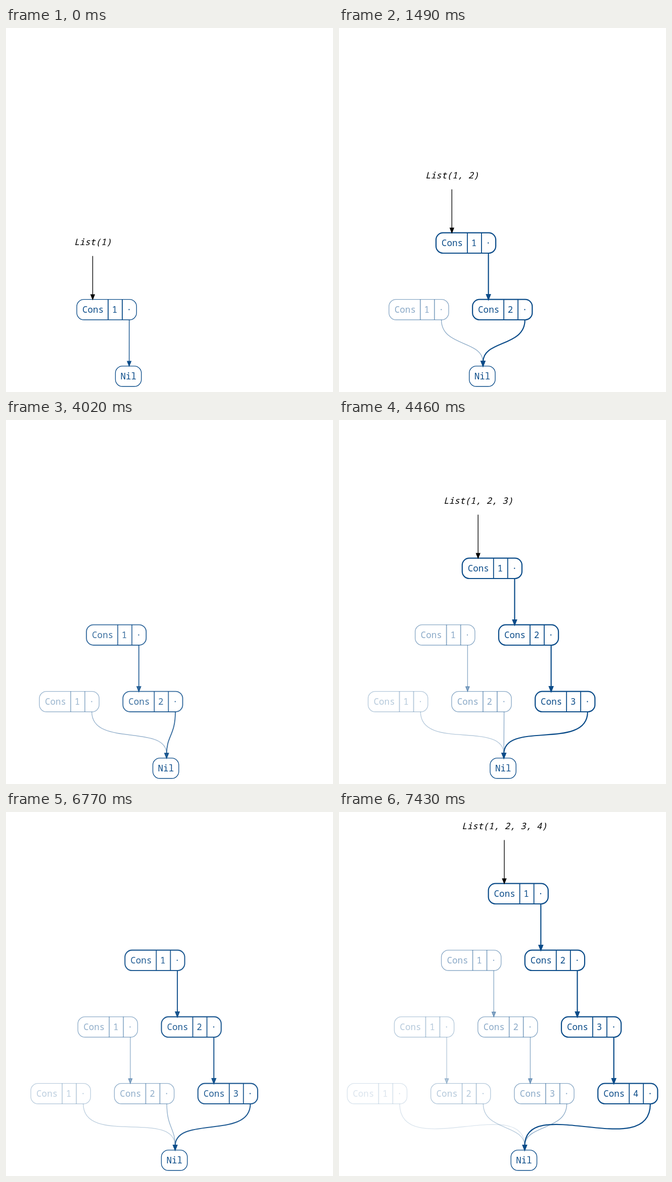
These frames come from a looping animation (647 by 721 pixels, 8 s). An HTML page with a canvas:

```html
<!DOCTYPE html>
<html lang="en">
<head>
<meta charset="utf-8">
<title>Appending to a persistent list</title>
<style>
  html, body { margin: 0; width: 100%; height: 100%; overflow: hidden; background: #fff; }
  canvas { display: block; }
</style>
</head>
<body>
<canvas id="stage" width="647" height="721"></canvas>
<script>
const ctx = document.getElementById("stage").getContext("2d");
const LOOP = 8000, STEP = 110, STEPS = 10;
const STARTS = [500, 3470, 6440];
const BLUE = "#0b4c89", THIN = 1.35, BOLD = 2.2;
const AGE_ALPHA = [1, 0.48, 0.3, 0.15];
const NIL_TOP = 669.6, ROW = 132, HEIGHT = 40.4;
const FONT = "17.6px 'Noto Sans Mono', monospace";

const lerp = (a, b, p) => a + (b - a) * p;
const clamp = v => Math.min(1, Math.max(0, v));
const easeQuart = t => t < 0.5 ? 8 * t ** 4 : 1 - 8 * (1 - t) ** 4;

// "size" is the list length, fractional while the layout moves.
const nilX = size => 216.5 + 41.25 * (size - 1);
const consX = (chain, item, size) =>
  140.1 + 165.3 * (chain - 1) - 41.25 * (size - 1) - 72.2 * (chain - item);
const consTop = (chain, item) => NIL_TOP - ROW * (chain - item + 1);

function pen(color, alpha, width) {
  ctx.strokeStyle = ctx.fillStyle = color;
  ctx.globalAlpha = alpha;
  ctx.lineWidth = width;
}

function text(string, x, y, style = "") {
  ctx.font = style + FONT;
  ctx.fillText(string, x, y);
}

function line(x1, y1, x2, y2) {
  ctx.beginPath();
  ctx.moveTo(x1, y1);
  ctx.lineTo(x2, y2);
  ctx.stroke();
}

function box(x, y, width) {
  ctx.beginPath();
  ctx.roundRect(x, y, width, HEIGHT, 14);
  ctx.stroke();
}

function arrowHead(x, tip) {
  ctx.beginPath();
  ctx.moveTo(x - 3.7, tip - 9.5);
  ctx.lineTo(x + 3.7, tip - 9.5);
  ctx.lineTo(x, tip);
  ctx.closePath();
  ctx.fill();
  ctx.stroke();
}

function arrow(x, from, tip) {
  line(x, from, x, tip - 9.5);
  arrowHead(x, tip);
}

// The wider the gap, the more the curve sags and rises.
function nilEdge(x, from, endX) {
  const bend = 624.4 + 0.00112 * (endX - x) ** 2;
  ctx.beginPath();
  ctx.moveTo(x, from);
  ctx.bezierCurveTo(x, bend, endX, 1250 - bend, endX, NIL_TOP - 8);
  ctx.stroke();
  arrowHead(endX, NIL_TOP);
}

function drawChain(chain, size, alpha, width) {
  for (let item = 1; item <= chain; item++) {
    const x = consX(chain, item, size), top = consTop(chain, item);
    const bottom = top + HEIGHT, tail = x + 103.7;
    pen(BLUE, alpha, width);
    box(x, top, 118.2);
    if (item < chain) arrow(tail, bottom, top + ROW);
    else nilEdge(tail, bottom, nilX(size) + 27.2);
    pen(BLUE, alpha, 1.8);
    line(x + 62, top, x + 62, bottom);
    line(x + 90, top, x + 90, bottom);
    text("Cons", x + 32, top + 26);
    text(item, x + 75, top + 26);
    text("·", tail - 0.3, top + 26);
  }
}

function drawLabel(size, alpha) {
  const x = consX(size, 1, size) + 31.4, top = consTop(size, 1);
  const items = Array.from({ length: size }, (_, i) => i + 1).join(", ");
  pen("#000", alpha, THIN);
  text(`List(${items})`, x + 0.4, top - 107.5, "italic ");
  arrow(x, top - 86, top);
}

function draw(size, t) {
  const layout = size + easeQuart(t), aging = t * t;
  const fadeOut = clamp(1 - t / 0.4), fadeIn = clamp((t - 0.6) / 0.4);
  const boldness = (chain, age) => chain > 1 && age === 0 ? BOLD : THIN;

  ctx.clearRect(0, 0, 647, 721);
  ctx.textAlign = "center";
  for (let chain = 1; chain <= size; chain++) {
    const age = size - chain;
    drawChain(chain, layout,
      lerp(AGE_ALPHA[age], AGE_ALPHA[age + 1] ?? 0, aging),
      lerp(boldness(chain, age), THIN, aging));
  }
  pen(BLUE, 1, THIN);
  box(nilX(layout), NIL_TOP, 51.3);
  text("Nil", nilX(layout) + 25.8, NIL_TOP + 26);

  if (fadeOut > 0) drawLabel(size, fadeOut);
  if (fadeIn > 0) {
    drawChain(size + 1, size + 1, fadeIn, BOLD);
    drawLabel(size + 1, fadeIn);
  }
}

function frame() {
  const now = performance.now() % LOOP;
  let size = 1, t = 0;
  for (const start of STARTS) {
    if (now < start) break;
    const step = Math.floor((now - start) / STEP) + 1;
    if (step >= STEPS) size++;
    else t = step / STEPS;
  }
  draw(size, t);
  requestAnimationFrame(frame);
}
frame();
</script>
</body>
</html>
```
